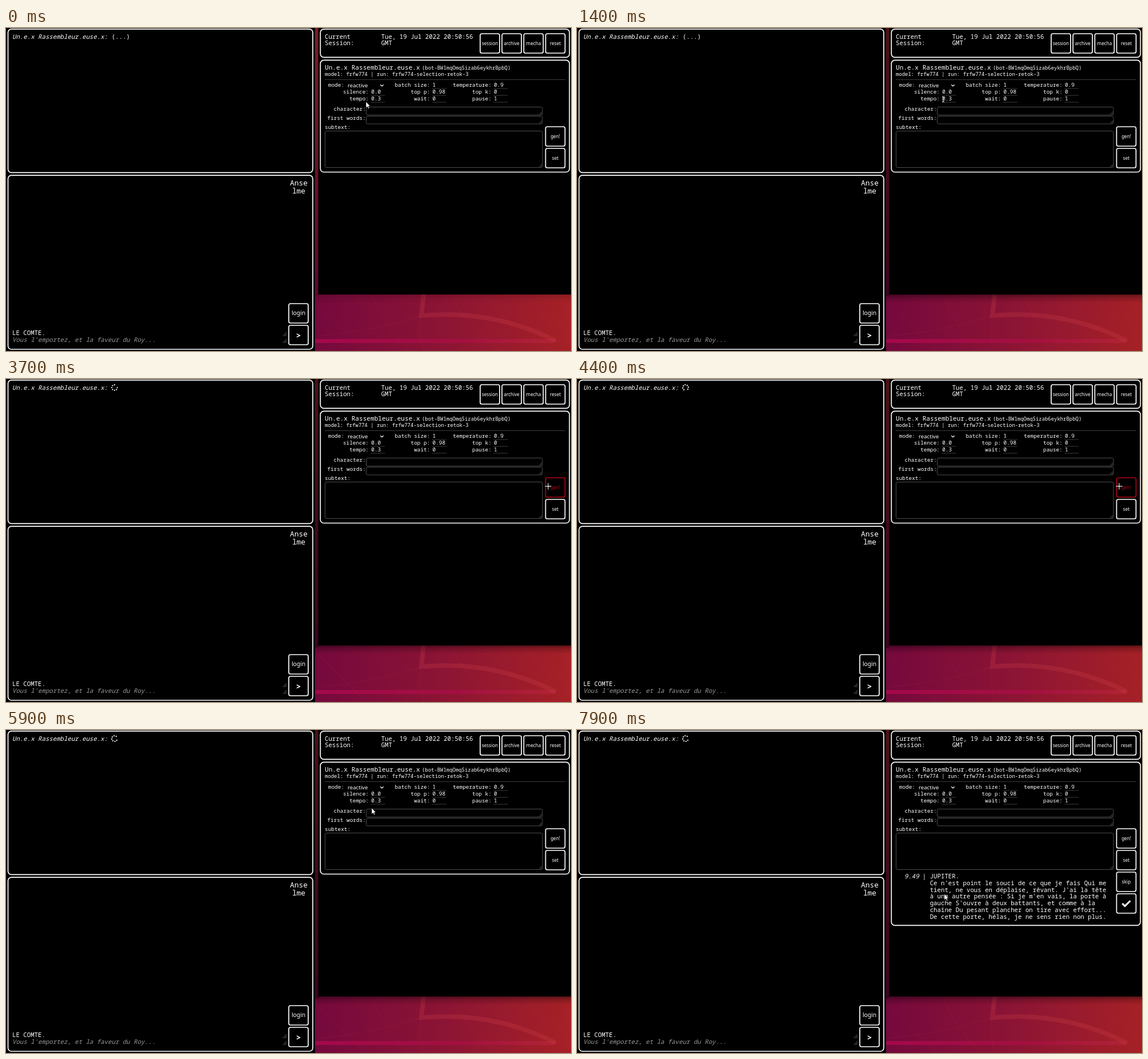
Recreate the animation shown at these times as an HTML page. Size 989 px wide and 566 px high, loop 8 s.

```html
<!DOCTYPE html>
<html lang="fr">
<head>
<meta charset="utf-8">
<title>Session</title>
<style>
  html, body { margin: 0; width: 100%; height: 100%; overflow: hidden; background: #000; }
  svg { display: block; width: 100%; height: 100%; }
  text { font: 10.73px "Noto Sans Mono", monospace; fill: #fff; white-space: pre; }
  .small { font-size: 8.93px; }
  .label { font-size: 9.4px; }
  .title { font-size: 11.12px; font-weight: 500; }
  .name { font-size: 12.9px; }
  .ui { font: 8.1px "Noto Sans", sans-serif; }
  .italic { font-style: italic; }
  .middle { text-anchor: middle; }
  .end { text-anchor: end; }
  .panel { fill: #000; stroke: #fff; stroke-width: 1.7; }
  .field { fill: none; stroke: #4c4c4c; }
  .rule { stroke: #3c3c3c; fill: none; }
  .grip { fill: #242424; }
</style>
</head>
<body>
<svg viewBox="0 0 989 566">
  <defs>
    <linearGradient id="wall"><stop stop-color="#75093d"/><stop offset=".5" stop-color="#8c1434"/><stop offset="1" stop-color="#a62126"/></linearGradient>
    <linearGradient id="strip" x2="0" y2="1"><stop stop-color="#a0212b"/><stop offset=".25" stop-color="#96192e"/><stop offset="1" stop-color="#770b3c"/></linearGradient>
    <linearGradient id="band"><stop stop-color="#a3084b"/><stop offset=".6" stop-color="#a31040"/><stop offset="1" stop-color="#b02435"/></linearGradient>
    <linearGradient id="fade" x2="0" y2="1"><stop stop-opacity=".85"/><stop offset=".4" stop-opacity=".35"/><stop offset="1" stop-opacity="0"/></linearGradient>
  </defs>

  <rect x="541" y="467" width="448" height="99" fill="url(#wall)"/>
  <rect x="541" width="6" height="467" fill="url(#strip)"/>
  <path d="M541 545H958L965 548L958 552H541Z" fill="url(#band)"/>
  <g fill="none" stroke="#d04048" stroke-opacity=".25">
    <path stroke-width="8" d="M731 467L727 504C806 497 885 509 962 548"/>
    <path stroke-opacity=".13" d="M547 483L630 566M640 467Q660 520 705 566M780 467Q800 520 868 566M836 467L925 566M547 540Q650 530 727 504M727 508Q720 540 733 566M905 467Q930 510 989 530"/>
  </g>
  <g id="shadow">
    <rect x="541" width="6" height="470"/>
    <rect x="541" y="467" width="448" height="15" fill="url(#fade)"/>
  </g>
  <rect width="541" height="566"/>
  <rect x="546.5" width="443" height="467"/>
  <g id="screen"></g>
  <g id="result"></g>
  <g id="spinner"></g>
  <g id="cursor" stroke="#000" stroke-width=".7" fill="#fff">
    <path id="arrow" d="M0 0V11L2.6 8.7L4.3 12.4L6 11.6L4.4 8H7.6Z"/>
    <path id="beam" fill="none" stroke="#ddd" stroke-width="1.1" d="M-2 -4.5H2M0 -4.5V4.5M-2 4.5H2"/>
    <path id="cross" d="M-.9 -6H.9V-.9H6V.9H.9V6H-.9V.9H-6V-.9H-.9Z"/>
  </g>
</svg>
<script>
const $ = id => document.getElementById(id);

function add(parent, tag, attrs, content = '') {
  const el = document.createElementNS('http://www.w3.org/2000/svg', tag);
  for (const key in attrs) el.setAttribute(key, attrs[key]);
  el.textContent = content;
  return parent.appendChild(el);
}
const screen = $('screen'), result = $('result');
const write = (x, y, content, cls = '', parent = screen) => add(parent, 'text', { x, y, class: cls }, content);
const box = (x, y, w, h, rx = 6, cls = 'panel', parent = screen) =>
  add(parent, 'rect', { x, y, width: w, height: h, rx, class: cls });
const line = (x, y, w) => add(screen, 'path', { d: `M${x} ${y}h${w}`, class: 'rule' });
const grip = (x, y, size) => add(screen, 'path', { d: `M${x} ${y}v${-size}l${-size} ${size}z`, class: 'grip' });

function button(x, y, content, size = 8.1, parent = screen) {
  const frame = box(x, y, 34, 34, 3, 'panel', parent);
  const caption = write(x + 17, y + 17 + size * .33, content, 'ui middle', parent);
  caption.style.fontSize = size + 'px';
  return { frame, caption };
}
function field(x, y, w, h) {
  box(x, y, w, h, 2.5, 'field');
  grip(x + w - 1, y + h - 1, 6);
}

// Left window
const bot = 'Un.e.x Rassembleur.euse.x';
box(3.5, 1.8, 533.5, 251.5);
write(11, 18.8, bot + ':', 'italic');
const idle = write(184.9, 18.8, '(...)');
box(3.5, 258.2, 533.5, 304.8);
write(512.5, 276, 'Anse', 'name middle');
write(512.5, 290, 'lme', 'name middle');
write(11, 537.6, 'LE COMTE.');
write(11, 549.6, "Vous l'emportez, et la faveur du Roy...", 'italic').style.fill = '#999';
grip(491, 540, 8);
grip(491, 552, 8);
button(495, 483, 'login', 10.3);
button(495, 521, '');
write(512, 544, '>', 'middle').style.cssText = 'font-size:15px;font-weight:600';

// Right window
box(550.3, 1.8, 436, 49.6);
write(558, 18.6, 'Current');
write(558, 30.4, 'Session:');
write(656.7, 18.6, 'Tue, 19 Jul 2022 20:50:56');
write(656.7, 30.4, 'GMT');
['session', 'archive', 'mecha', 'reset'].forEach((name, i) => button(830 + 38.2 * i, 10, name));

const control = box(550.3, 56.3, 436, 196.2);
write(558, 73.2, bot, 'title');
write(728, 73, '(bot-BW1mqOmqSizab6eykhrBpbQ)', 'small');
write(558, 84.2, 'model: frfw774 | run: frfw774-selection-retok-3', 'small');
line(558, 90.5, 421);

write(592, 102.6, 'mode:', 'label end');
write(598, 103.6, 'reactive', 'ui').style.fontSize = '9.6px';
add(screen, 'path', { d: 'M655.3 99.2l2.7 2.7l2.7 -2.7', fill: 'none', stroke: '#fff', 'stroke-width': 1.3 });
[
  [635, 1, ['silence:', '0.0'], ['tempo:', '0.3']],
  [742.3, 0, ['batch size:', '1'], ['top p:', '0.98'], ['wait:', '0']],
  [849.8, 0, ['temperature:', '0.9'], ['top k:', '0'], ['pause:', '1']]
].forEach(([x, first, ...rows]) => rows.forEach(([label, value], i) => {
  const y = 102.6 + 12 * (first + i);
  write(x, y, label, 'label end');
  write(x + 4.3, y, value, 'label');
  line(x + 3.5, y + 3.4, 25);
}));
write(629.8, 145.2, 'character:', 'label end');
write(629.8, 161.2, 'first words:', 'label end');
write(558, 177.2, 'subtext:', 'label');
field(630.5, 138.5, 308.5, 14);
field(630.5, 154.5, 308.5, 13.5);
field(558.5, 180.5, 380.5, 64);
const gen = button(944.5, 173, 'gen!');
button(944.5, 211, 'set');

// Generated verse
write(573, 260.2, '9.49', 'italic', result);
write(604.8, 260.2, '|', '', result);
[
  'JUPITER.',
  "Ce n'est point le souci de ce que je fais Qui me",
  "tient, ne vous en déplaise, rêvant. J'ai la tête",
  "à une autre pensée : Si je m'en vais, la porte à",
  "gauche S'ouvre à deux battants, et comme à la",
  'chaîne Du pesant plancher on tire avec effort...',
  'De cette porte, hélas, je ne sens rien non plus.'
].forEach((verse, i) => write(617.7, 260.2 + 11.72 * i, verse, '', result));
button(944.5, 249, 'skip', 8.1, result);
const count = button(944.5, 287, '0', 17, result).caption;
count.style.fill = '#b00012';
const check = add(result, 'path', { d: 'M954.5 304l4.6 4.6l9.4 -9.4', fill: 'none', stroke: '#fff', 'stroke-width': 3 });

// Seven dots on a ring of eight, the upper right one missing
for (let i = 0; i < 7; i++) {
  const a = i * Math.PI / 4;
  add($('spinner'), 'circle', { cx: 4.87 * Math.cos(a), cy: 4.87 * Math.sin(a), r: 1.12, fill: '#fff' });
}

// Pointer path: time, x, y
const path = [
  [0, 630, 129], [300, 636, 127], [500, 636, 127], [1000, 641, 125], [1600, 641, 125],
  [1900, 659, 125], [2000, 659, 125], [2100, 664, 125.5], [2300, 664, 125.5], [2500, 698, 126],
  [2600, 698, 126], [3000, 940, 212], [3100, 949, 188], [4500, 949, 188], [4900, 641, 138],
  [5500, 641, 138], [5600, 640, 136.5], [7200, 640, 136.5], [7800, 643, 287], [8000, 643, 287]
];
function pointer(t) {
  const i = path.findIndex(p => p[0] > t);
  const [t0, x0, y0] = path[i - 1], [t1, x1, y1] = path[i];
  const k = (t - t0) / (t1 - t0);
  return [x0 + (x1 - x0) * k, y0 + (y1 - y0) * k];
}
const show = (el, on) => el.setAttribute('visibility', on ? 'visible' : 'hidden');

function draw(now) {
  const t = Math.floor(now % 8000 / 100) * 100;
  const hover = t >= 3100 && t < 4600, typing = t >= 800 && t < 2500;
  const busy = t >= 3700, done = t >= 6100, ready = t >= 7200;

  $('shadow').setAttribute('opacity', t < 1300 ? .2 : t < 1400 ? .38 : .5);
  show(idle, !busy);
  show($('spinner'), busy);
  $('spinner').setAttribute('transform', `translate(190 15) rotate(${(t - 3700) * .18})`);

  const red = t < 3500 ? '#cc0a20' : '#b4001a';
  gen.frame.style.stroke = hover ? red : '#fff';
  gen.caption.style.fill = hover ? red : '#fff';

  control.setAttribute('height', done ? 286 : 196.2);
  $('result').style.display = done ? '' : 'none';
  count.style.display = ready ? 'none' : '';
  check.style.display = ready ? '' : 'none';
  check.style.opacity = t < 7300 ? .6 : 1;

  show($('arrow'), !hover && !typing);
  show($('beam'), typing);
  show($('cross'), hover);
  $('cursor').setAttribute('transform', `translate(${pointer(t)})`);
}
function tick() {
  draw(performance.now());
  requestAnimationFrame(tick);
}
tick();
</script>
</body>
</html>
```
